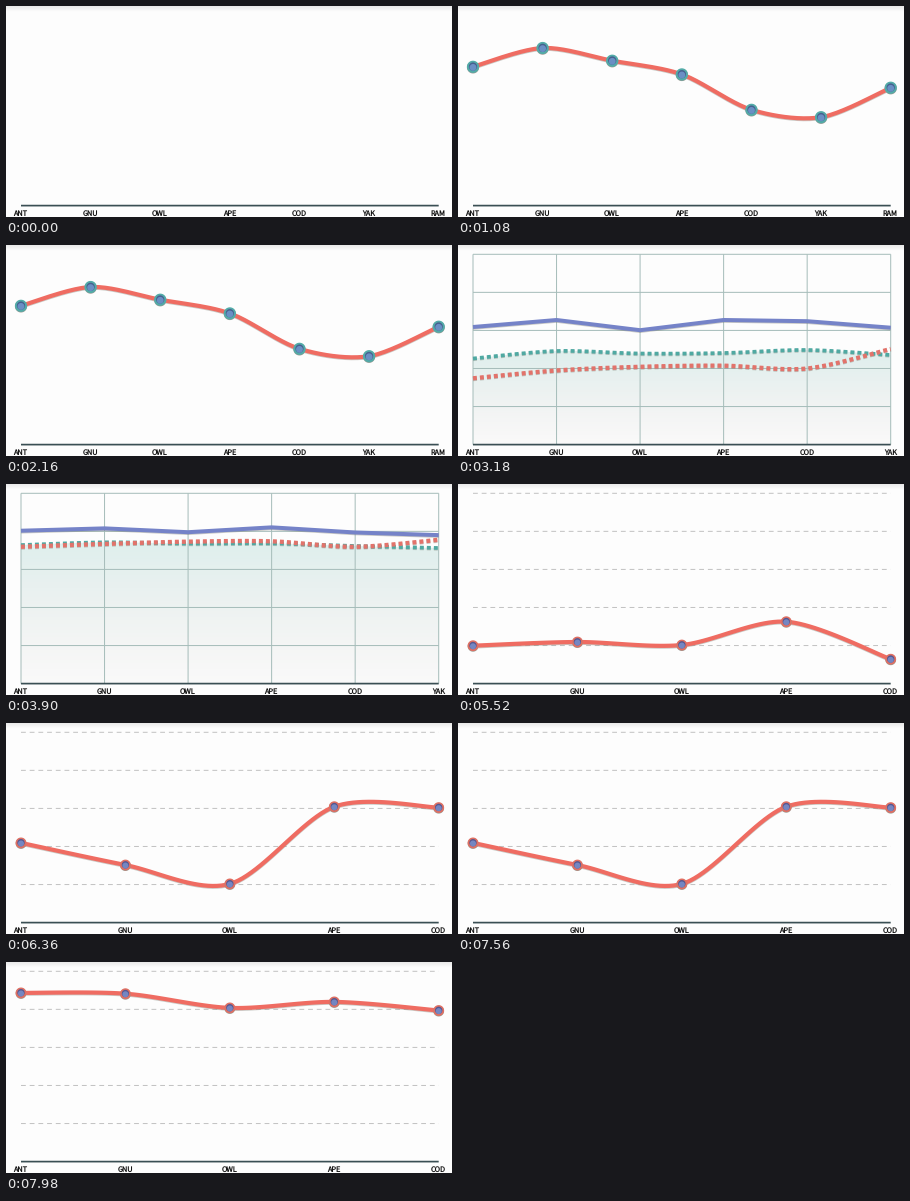
These frames come from a looping animation (446x211 px, 8000 ms). A matplotlib script:

```python
import numpy as np
import matplotlib.pyplot as plt
from matplotlib.animation import FuncAnimation
from matplotlib.path import Path

W, H, DPI = 446, 211, 64
PT = 72 / DPI                      # points per pixel
LOOP, STEP, HOLD = 8000, 20, 60    # ms
LEFT, RIGHT, TOP, BASE = 15, 432.7, 9.3, 199.6
NAMES = ["ANT", "GNU", "OWL", "APE", "COD", "YAK", "RAM"]
RED, TEAL, PURPLE = "#ef6c62", "#4fa9a2", "#7583c8"
GRID = "#a6bdba"

plt.rcParams["text.hinting"] = "none"
fig = plt.figure(figsize=(W / DPI, H / DPI), dpi=DPI, facecolor="#fdfdfd")
ax = fig.add_axes([0, 0, 1, 1])
ax.axis("off")

shade = np.linspace(0.92, 0.992, 6)[:, None, None] * np.ones((1, 1, 3))
ax.imshow(shade, extent=(0, W, 6, 0), aspect="auto", zorder=0)
ax.set(xlim=(0, W), ylim=(H, 0))
ax.set_autoscale_on(False)


def stroke(x, y, color, px, z, **kw):
    return ax.plot(x, y, color=color, lw=px * PT, zorder=z, snap=False,
                   solid_capstyle="butt", dash_capstyle="butt", **kw)[0]


def smooth(x, y, n=24):
    """Cubic Bezier chain whose handles follow the neighbouring points."""
    p = np.column_stack([x, y])
    q = np.vstack([p[:1], p, p[-1:]])
    d = 0.15 * (q[2:] - q[:-2])
    u = np.linspace(0, 1, n)[:, None]
    parts = [(1 - u) ** 3 * a + 3 * u * (1 - u) ** 2 * (a + da)
             + 3 * u * u * (1 - u) * (b - db) + u ** 3 * b
             for a, b, da, db in zip(p, p[1:], d, d[1:])]
    return np.vstack(parts).T


def ease_out(u):
    return 1 - (1 - np.clip(u, 0, 1)) ** 3


def disc(x, y, r):
    a = np.linspace(0, 2 * np.pi, 33)
    return np.column_stack([x + r * np.cos(a), y + r * np.sin(a)])


class Series:
    """One line; moves are (start, end, target heights)."""

    def __init__(self, moves, color, px, curved=True, dash=None,
                 ring=None, radius=0, fill=False):
        self.moves, self.curved = moves, curved
        self.x = np.linspace(LEFT, RIGHT, len(moves[0][2]))
        style = {"ls": (0, (dash[0] / px, dash[1] / px))} if dash else {}
        self.shadow = stroke([], [], "#77776c", px, 4, alpha=0.38, **style)
        self.line = stroke([], [], color, px, 5, **style)
        self.dots = []
        if ring:
            layers = [("#9a9a92", radius, 0.6), (ring[0], radius, 0),
                      (ring[1], radius * 0.68, -0.2), (ring[2], radius * 0.56, 0.6)]
            for color, r, dy in layers:
                for k in range(len(self.x)):
                    patch = ax.fill([0], [0], color=color, lw=0, zorder=6, snap=False)[0]
                    self.dots.append((patch, k, r, dy))
        self.area = None
        if fill:
            u = np.linspace(0, 1, 100)[:, None]
            rgba = np.zeros((100, 1, 4))
            rgba[:, 0, :3] = (np.array([98, 184, 174]) * (1 - u)
                              + np.array([150, 140, 136]) * u) / 255
            rgba[:, 0, 3] = np.linspace(0.2, 0.03, 100)
            self.area = ax.imshow(rgba, extent=(LEFT, RIGHT, BASE, TOP),
                                  aspect="auto", zorder=1)

    def parts(self):
        area = [self.area] if self.area else []
        return [self.shadow, self.line] + [d[0] for d in self.dots] + area

    def update(self, t):
        y = np.full(len(self.x), BASE)
        for start, end, target in self.moves:
            y = y + (np.array(target) - y) * ease_out((t - start) / (end - start))
        cx, cy = smooth(self.x, y) if self.curved else (self.x, y)
        self.line.set_data(cx, cy)
        self.shadow.set_data(cx, cy + 0.8)
        for patch, k, r, dy in self.dots:
            patch.set_xy(disc(self.x[k], y[k] + dy, r))
        if self.area:
            top = min(cy.min(), BASE - 1)
            self.area.set_extent((LEFT, RIGHT, BASE, top))
            outline = np.column_stack([np.r_[LEFT, cx, RIGHT], np.r_[BASE, cy, BASE]])
            self.area.set_clip_path(Path(outline), ax.transData)


class Chart:
    def __init__(self, begin, end, n, series, grid=None, line_from=None):
        self.begin, self.end, self.series = begin, end, series
        self.line_from = begin if line_from is None else line_from
        xs = np.linspace(LEFT, RIGHT, n)
        rows = np.linspace(TOP, BASE, 6)[:-1]
        self.frame = [ax.text(x - 0.3, 209.5, s, ha="center", va="baseline", color="#161616",
                              family="Noto Sans CJK JP", size=7.3 * PT)
                      for x, s in zip(xs, NAMES)]
        if grid == "full":
            self.frame += [stroke([x, x], [TOP, BASE], GRID, 1, 2) for x in xs]
            self.frame += [stroke([LEFT, RIGHT], [y, y], GRID, 1, 2) for y in rows]
        elif grid == "dashed":
            self.frame += [stroke([LEFT, RIGHT], [y, y], "#c2c2c2", 1, 2, ls=(0, (4.8, 3.9)))
                           for y in rows]

    def update(self, t):
        shown = self.begin <= t < self.end
        for part in self.frame:
            part.set_visible(shown)
        drawn = shown and t >= self.line_from
        for s in self.series:
            for part in s.parts():
                part.set_visible(drawn)
            if drawn:
                s.update(t)


stroke([LEFT, RIGHT], [BASE, BASE], "#3a4f54", 1.7, 3)

wave = np.array([60.8, 42, 54.7, 68.4, 103.8, 111.2, 81.7])
first = Series([(60, 600, BASE - 0.89 * (BASE - wave)), (720, 1080, wave)],
               RED, 4.2, ring=("#52aba8", "#46608f", "#6a8fc4"), radius=6.1)


def pair(a, b):
    return [(2760, 3180, a), (3660, 4500, b)]


trio = [
    Series(pair([113.5, 106, 108.5, 108, 105, 110], [31, 31, 31.5, 31.5, 37.3, 37.6]),
           TEAL, 3.7, dash=(3.9, 3.1), fill=True),
    Series(pair([133.3, 125.5, 121.8, 120.7, 123.5, 104], [22.3, 22.3, 20.9, 21, 28, 28.2]),
           "#e2736b", 4.3, dash=(3.9, 3.1)),
    Series(pair([82, 75, 85.2, 75, 76.2, 82.7], [26.5, 26.8, 27, 25.2, 32.6, 33]),
           PURPLE, 4, curved=False),
]

last = Series([(4740, 5520, [161.7, 158, 161, 137.7, 175.2]),
               (5580, 5940, [119.9, 142, 160.9, 83.7, 84.6]),
               (7560, 7980, [30.9, 31.7, 45.9, 39.9, 48.5])],
              RED, 4.2, ring=("#e06f62", "#56568f", "#7486c2"), radius=5.4)

charts = [
    Chart(0, 2820, 7, [first], line_from=120),
    Chart(2820, 4800, 6, trio, grid="full"),
    Chart(4800, LOOP, 5, [last], grid="dashed"),
]


def draw(i):
    t = i * STEP // HOLD * HOLD
    for chart in charts:
        chart.update(t)
    return []


anim = FuncAnimation(fig, draw, frames=LOOP // STEP, interval=STEP,
                     init_func=lambda: draw(0), repeat=True, repeat_delay=0)
plt.show()
```
